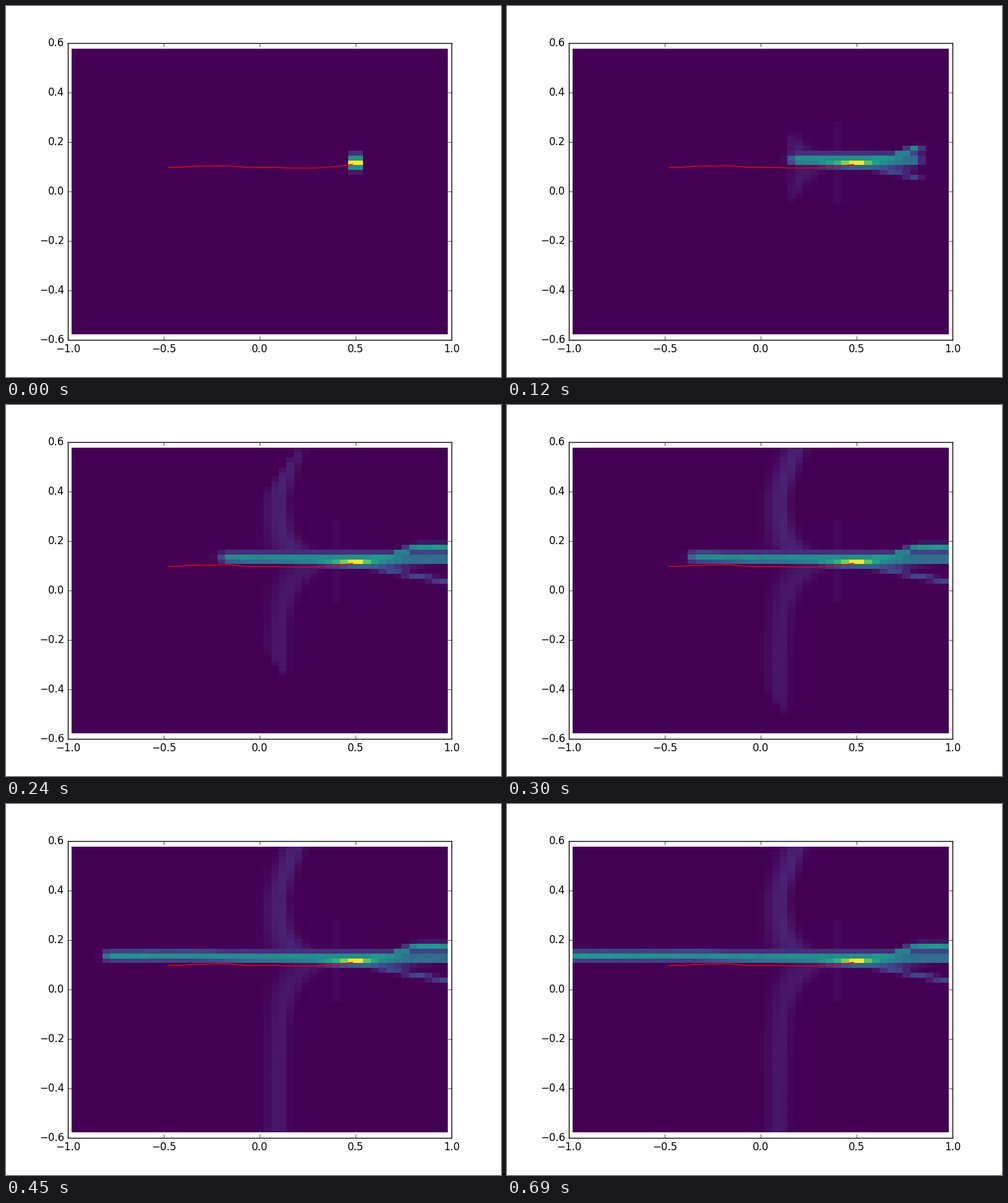
These frames come from a looping animation (800x600 px, 720 ms). A matplotlib script:

```python
import matplotlib.pyplot as plt
import numpy as np
from matplotlib.animation import FuncAnimation

plt.style.use("classic")

FRAMES, INTERVAL = 24, 30
ROWS, COLS = 59, 49
MID = 23                 # row of the brightest cells
SOURCE = 36.5            # column between the two source cells

row, col = np.mgrid[0:ROWS, 0:COLS].astype(float)
drop = row - MID
dist = np.abs(drop)


def bell(x, width):
    return np.exp(-(x / width) ** 2)


def ease(x, start, end):
    t = np.clip((x - start) / (end - start), 0, 1)
    return t * t * (3 - 2 * t)


def beam():
    """Three rows running left and right from the glowing source."""
    reach = np.maximum(np.abs(col - SOURCE) - .5, 0)
    glow = np.exp(-reach / np.where(col < SOURCE, 2.7, 1.8))
    core = .18 + .18 * ease(col, 14, 25) + .64 * glow
    upper = .53 - .04 * ease(col, 0, 20) - .14 * ease(col, 41, 43.5)
    fringe = .2 - .07 * ease(col, 17, 20) + .07 * ease(col, 40, 45)
    under = .32 * bell(col - 37.5, 5)
    layers = {MID: core, MID - 1: upper, MID - 2: fringe, MID + 1: under}
    return sum(np.where(row == r, value, 0) for r, value in layers.items())


def branches():
    """Upper arm levels off, lower arm keeps sinking."""
    rising = MID - 1 - 2 * ease(col, 40, 45)
    sinking = MID + 1 + .3 * (col - 38)
    up = .53 * bell(row - rising, .65) * (col >= 39)
    down = .22 * bell(row - sinking, .55) * (col >= 38)
    return np.maximum(up, down)


def plume():
    """Faint curved column, softer on its left side."""
    above = drop < 0
    bend = 5 * np.exp(-dist / np.where(above, 2.8, 4.5))
    lean = 2.2 * np.clip(1 - row / 10, 0, 1) ** 1.2
    off = col - (26.5 + bend + lean)
    width = np.where(off < 0, 1.7, 1.1) + 2 * np.exp(-dist / 3.5)
    return np.where(above, .095, .062) * bell(off, width)


def haze():
    box = (dist < 9) & (col >= 31) & (col <= 37)
    return np.where(box, .006 + .016 * (col == 34), 0)


def arrival_time():
    """Frame at which the spreading front reaches each cell."""
    along = np.where(col < SOURCE, 4 + (27.6 - col) / 2.2, (col - 37) / 2)
    along = np.where(np.abs(col - SOURCE) < 1, -1, along)
    slant = 2 * np.maximum(0, np.where(drop < 0, 29, 27) - col)
    climb = np.where(col < 32, 4 + (dist - 8 + slant) / 3.9, (dist - 2) / 2.2)
    off_beam = (dist > 2) & (col < 41)
    return np.where(off_beam, np.maximum(along, climb), along)


DENSITY = np.maximum.reduce([beam(), branches(), plume(), haze()])
DENSITY *= np.random.default_rng(4).normal(1, .015, DENSITY.shape)
ARRIVAL = arrival_time()
PULSE = bell(drop, 1.2) * (np.abs(col - SOURCE) < 1)


def density_at(n):
    age = n - ARRIVAL
    gain = np.where(age >= 0, np.minimum(.3 + 1.5 * age, 1),
                    np.where(age > -.45, .05, 0))
    return np.maximum(DENSITY * gain, PULSE * np.exp(-n))


fig, ax = plt.subplots(figsize=(8, 6), dpi=100, facecolor="white")
ax.set_position([.125, .1, .775, .8])
mesh = ax.pcolormesh(np.linspace(-.98, .98, COLS + 1),
                     np.linspace(.5763, -.5782, ROWS + 1),
                     density_at(0), cmap="viridis", vmin=0, vmax=1)

path_x = [-.477, -.403, -.345, -.168, -.065, .08, .145, .29, .419, .484]
path_y = [.0975, .0985, .102, .104, .0975, .097, .095, .095, .102, .110]
ax.plot(path_x, path_y, color="red", lw=1)

ax.set_xlim(-1, 1)
ax.set_ylim(-.6, .6)
ax.set_xticks(np.linspace(-1, 1, 5))
ax.set_yticks(np.linspace(-.6, .6, 7))


def update(n):
    mesh.set_array(density_at(n))
    return (mesh,)


anim = FuncAnimation(fig, update, frames=FRAMES, interval=INTERVAL,
                     repeat=True, repeat_delay=0, blit=False)
plt.show()
```
